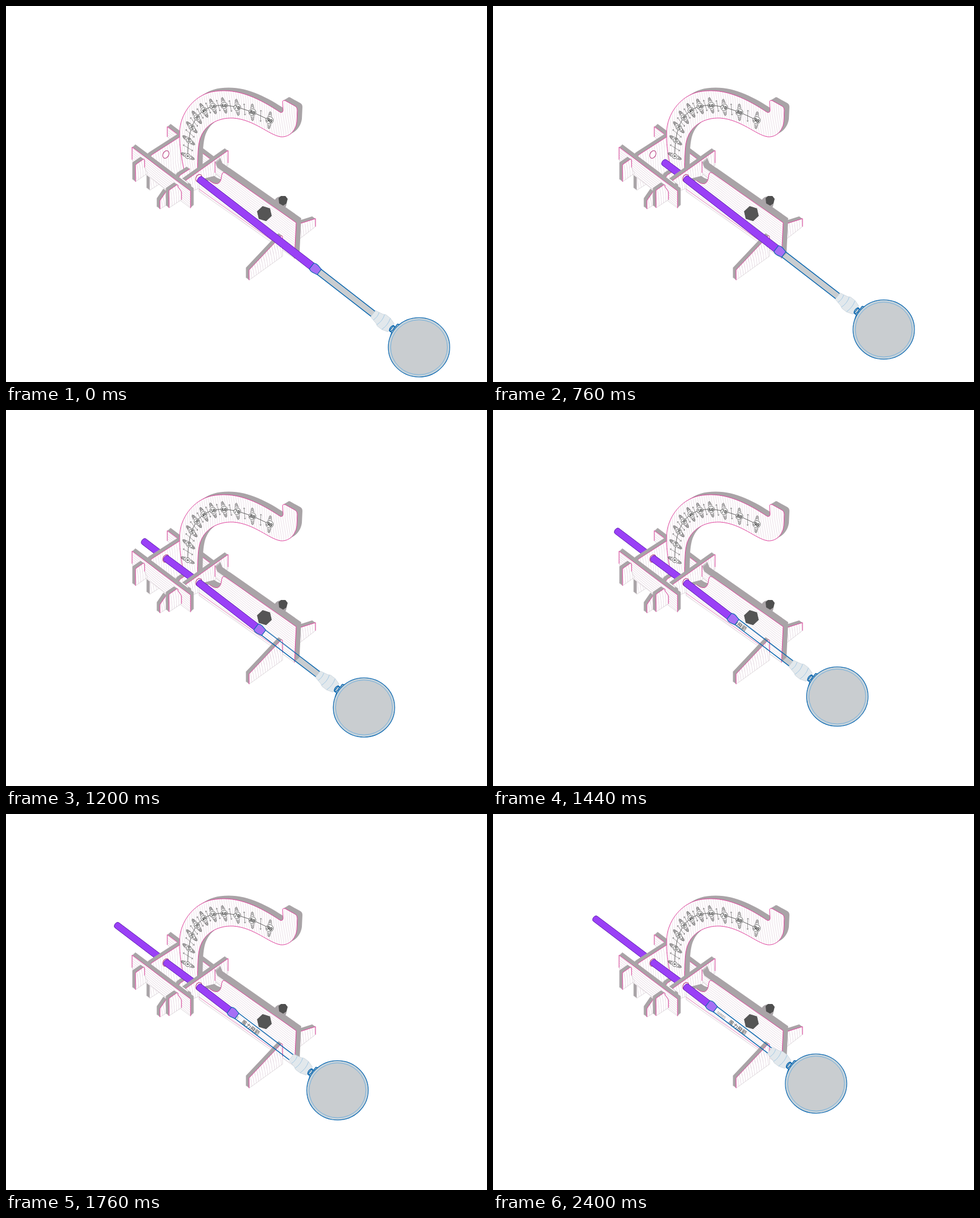
An HTML page that plays this animation: 847 px wide and 661 px high, repeating every 3.4 s.

```html
<!DOCTYPE html>
<html lang="zh-Hant">
<head>
<meta charset="utf-8">
<title>Launcher assembly</title>
<style>
html, body { margin: 0; width: 100%; height: 100%; overflow: hidden; background: #fff; }
svg { display: block; width: 847px; height: 661px; }
path, ellipse { vector-effect: non-scaling-stroke; stroke-linejoin: round; }
.side { fill: #a9a4a7; }
.rim { stroke: #c9c2c6; stroke-width: .6; }
.edge { fill: none; stroke: #e0409c; stroke-width: 1; }
.hole { fill: #fff; stroke: #bd4b88; stroke-width: 1.2; }
.grain { fill: none; stroke: #e4d6e0; stroke-width: .8; }
.pipe { fill: #9a40f6; stroke: #5c1bb0; stroke-width: 1; }
.blue { fill: none; stroke: #0c68b0; stroke-width: 1.5; }
.thin { fill: none; stroke: #5fa6da; stroke-width: .8; }
.ink { fill: none; stroke: #3a3a3a; stroke-width: .8; }
.tint { fill: #c5d2da; }
.grey { fill: #c9cdd0; }
text { text-anchor: middle; }
.num { font: bold 8px "Liberation Serif", "Noto Serif", serif; fill: #222; }
.cjk { font: 500 9.4px "Noto Sans CJK TC", "Noto Sans CJK", "Noto Sans CJK JP", sans-serif; fill: #444; }
.tag { font: 5.6px "Noto Sans", sans-serif; fill: #777; }
</style>
</head>
<body>
<svg id="stage" viewBox="0 0 847 661">
  <defs id="defs"></defs>
  <g id="glass"></g>
  <path id="pipeA" class="pipe"/>
  <g id="back"></g>
  <path id="pipeB" class="pipe"/>
  <g id="front"></g>
  <path id="pipeC" class="pipe"/>
  <g id="fitting"></g>
</svg>
<script>
const $ = id => document.getElementById(id);
const path = (d, cls, extra = '') => `<path d="${d}" class="${cls}" ${extra}/>`;
const oval = (x, y, rx, ry, cls, turn = 0) =>
  `<ellipse class="${cls}" rx="${rx}" ry="${ry}" transform="translate(${x} ${y}) rotate(${turn})"/>`;
const words = (x, y, cls, turn, s) =>
  `<text class="${cls}" dy=".36em" transform="translate(${x} ${y}) rotate(${turn})">${s}</text>`;

// wavy wood grain
const grain = (id, turn, wave) =>
  `<pattern id="${id}" width="64" height="16" patternUnits="userSpaceOnUse" patternTransform="rotate(${turn})">
  <rect width="64" height="16" fill="#fff"/>` +
  [2, 6, 10, 14].map(y => path(`M0 ${y}Q16 ${y - wave} 32 ${y}T64 ${y}`, 'grain')).join('') + '</pattern>';
$('defs').innerHTML = grain('along', 3, 1) + grain('across', 84, 2);

function extrude(d, dx, dy, place) {
  let out = '';
  for (let i = 8; i > 0; i--)
    out += path(d, 'side', `transform="translate(${dx * i / 8} ${dy * i / 8}) ${place}"`);
  return out;
}

// board in a plane sheared by slope; the cut edge is pink, the rest of the outline pale
function board(x, y, slope, cut, rest = '', thick = 1) {
  const place = `matrix(1 ${slope} 0 1 ${x} ${y})`;
  const d = cut + rest + 'Z', wood = slope > 0 ? 'along' : 'across';
  return extrude(d, (slope > 0 ? 5.5 : -5.5) * thick, (slope > 0 ? -5 : -4) * thick, place) +
    path(d, 'rim', `fill="url(#${wood})" transform="${place}"`) +
    path(cut, 'edge', `transform="${place}"`);
}

function scale() {
  const rim = 'M316 300C307 262 305 236 306 217C309 184 335 154 368 150C410 144 448 164 483 187Q488 188 488 183' +
    'L487 168Q488 165 491 166L509 176Q513 178 513 183L512 204C510 219 499 231 484 230' +
    'C463 227 438 200 400 197C372 196 348 210 341 236C337 252 338 270 337 288Z';
  let out = extrude(rim, 9, -5.4, '') + path(rim, 'edge', 'style="fill:url(#across)"');

  const at = i => [320 + 1.78 * i * i, 264 - 30.6 * i + 2.62 * i * i];
  const lean = i => 25 + 70 * Math.pow(i / 9, .8);
  let line = 'M';
  for (let i = 0; i <= 9; i += .25) line += at(i) + ' ';
  out += path(line, 'ink');

  for (let i = 0; i < 10; i++) {
    const turn = Math.atan2(5.24 * i - 30.6, 3.56 * i) * 180 / Math.PI;
    const r = 4.2 + i * .25;
    let marks = '';
    for (const s of [-1, 1])
      for (let j = 0; j < 3; j++) {
        const u = s * (r + 1 + j * 2.4), h = 3.6 - j * .6;
        marks += `M${u} ${-h}L${u + s * 3} 0L${u} ${h}`;
      }
    out += `<g transform="translate(${at(i)})">` +
      path(marks, 'ink', `transform="rotate(${lean(i)})"`) +
      oval(0, 0, r, r, 'ink', 0).replace('/>', ' style="fill:#fff"/>') +
      `<g transform="scale(${.8 + i * .05})">${words(0, 0, 'num', turn, i * 10)}</g></g>`;
    if (i < 9)
      out += `<g transform="translate(${at(i + .5)}) rotate(${lean(i + .5)})">` +
        path('M-8 -1.5L-10 0L-8 1.5M-10 0H10M8 -1.5L10 0L8 1.5', 'ink', 'style="stroke-width:.5"') + '</g>';
  }
  return out;
}

$('back').innerHTML =
  board(284, 212, .75, 'M0 18V0H98', 'V20') +
  board(253, 264, -.64, 'M0 6Q0 0 5 0H55', 'V60H0') +
  oval(281.5, 261, 5, 7, 'hole', 28) +
  scale() +
  board(304, 299, -.64, 'M0 8V3Q1 0 4 0H20', 'V12');

let hex = 'M';
for (let a = 17; a < 377; a += 60)
  hex += [455 + 13.6 * Math.cos(a * Math.PI / 180), 365 + 13.6 * Math.sin(a * Math.PI / 180)] + ' ';

$('front').innerHTML =
  board(316, 307, -.707, 'M0 0H75V22', 'V26L52 28V40L10 26V14') +
  oval(339.5, 302.5, 5, 6.8, 'hole', 28) +
  oval(483, 347, 11, 12, 'side') +
  board(519, 382, -.7, 'M0 0L26 10V24', 'L-2 26') +
  board(372, 284, .7, 'M-4 12V-8', 'L0 0H12V14', 1.6) +
  board(384, 292, .7, 'M-26 33Q-9 34 -5 15Q-4 0 2 0H127L124 65', 'H-44V50', 1.6) +
  path('M340 322L470 413', 'edge', 'opacity=".6"') +
  path('M480 338L484 334H492L496 339L494 347L488 351L481 347Z', '', 'fill="#4f4f4f"') +
  path(hex + 'Z', '', 'fill="#555"') +
  words(430.5, 375.5, 'cjk', 36.5, '風力飛箭') +
  words(402, 353.5, 'tag', 36.5, 'SERIES') +
  board(428, 464, -.7, 'M0 18V0L56 -20Q59 -21 59 -14V4', 'V17') +
  board(271, 342, -.7, 'M0 15V0L12 -9', 'V16') +
  board(222, 248, .75, 'M0 22V0H103V30', 'L86 30H24L2 27') +
  board(228, 279, -.7, 'M0 30V0H13Q16 0 16 4V16', 'L21 30') +
  board(287, 324, -.7, 'M0 31V0H13Q16 0 16 5L22 18V32');

// tube, cap and balloon lie along x, starting from the collar
const tilt = 37.8;
const tube = 'M8 -5.7H131V5.7H8Z';
const neck = 'M180 -15L174 -12V-5H170V6H175L178 14';
$('glass').innerHTML =
  path(tube, 'grey') +
  path(neck, 'blue', 'style="fill:#c5d2da"') +
  oval(229, -3, 54, 52, 'blue', -tilt) +
  oval(229, -3, 53.5, 51.5, 'tint', -tilt) +
  oval(229, -3, 50, 48.2, 'grey', -tilt) +
  oval(229, -3, 50, 48.2, 'thin', -tilt);

$('fitting').innerHTML =
  path('M8 -5.7H131M8 5.7H131', 'blue') +
  path('M-8 -6.5L-4 -8H0L9 -6V6L0 8H-4L-8 6.5Z', 'blue', 'style="fill:#a66ff5;stroke-width:1.2"') +
  path('M129 -7L143 -10L148 -12.5H158L169 -9V9L158 12.5H148L143 10L129 7Z', '', 'fill="#e2e8ec" stroke="#c8d4dc" stroke-width=".8"') +
  path('M136 -8Q139 0 136 8M146 -11Q150 0 146 11M158 -12Q162 0 158 12', 'thin', 'opacity=".6"') +
  oval(171, 0, 3, 6, 'blue');

// share of the travel done after k of 48 steps
const travel = k => {
  const s = Math.min(1, Math.max(0, k / 48));
  return 1 - Math.pow(1 - Math.pow(s, 1.13), 2.36);
};

function pipe([ax, ay], [bx, by]) {
  const half = x => 5.6 + (x - 180) * .0034;
  const side = (x, y, s) => `${x + s * .607 * half(x)} ${y - s * .795 * half(x)}`;
  return `M${side(ax, ay, 1)}L${side(bx, by, 1)}L${side(bx, by, -1)}L${side(ax, ay, -1)}A3.8 ${half(ax)} 37.4 0 1 ${side(ax, ay, 1)}Z`;
}

const rear = [282, 261], fore = [340, 304];
function draw(t) {
  const p = travel(Math.floor((t - 480) / 40));
  const tail = [341.5 - 161.5 * p, 305 - 121 * p];
  const head = [544.5 - 160 * p, 462 - 124 * p];
  $('pipeA').setAttribute('d', tail[0] < rear[0] ? pipe(tail, rear) : '');
  $('pipeB').setAttribute('d', tail[0] < fore[0] ? pipe(tail[0] < rear[0] ? rear : tail, [343, 306]) : '');
  $('pipeC').setAttribute('d', pipe(tail[0] > fore[0] ? tail : fore, head));
  for (const id of ['glass', 'fitting'])
    $(id).setAttribute('transform', `translate(${head}) rotate(${tilt - .65 * p})`);
}

const start = performance.now();
function tick() {
  draw((performance.now() - start) % 3400);
  requestAnimationFrame(tick);
}
tick();
</script>
</body>
</html>
```
